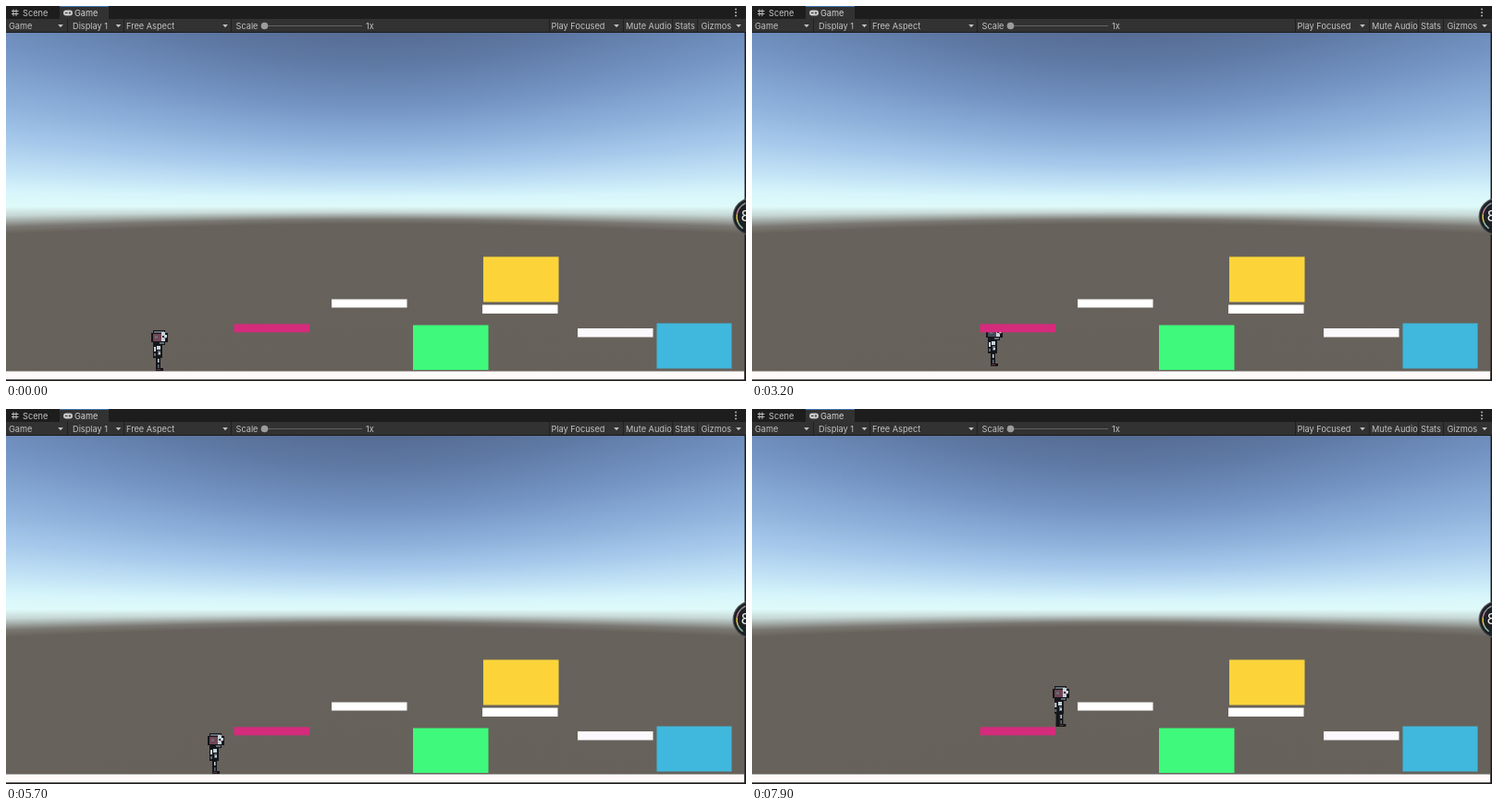
An HTML page with a canvas that plays this animation: 800x406 px, repeating every 8000 ms.

```html
<!DOCTYPE html>
<html lang="en">
<head>
<meta charset="utf-8">
<style>
  html, body { margin: 0; width: 100%; height: 100%; overflow: hidden; background: #191919; }
  canvas { display: block; width: 800px; height: 406px; }
</style>
</head>
<body>
<canvas id="stage" width="800" height="406"></canvas>
<script>
const W = 800, H = 406, LOOP = 8000, STEP = 100;
const GROUND = 395, LEDGE = 344, JUMP = 73, RISE = 577;
const ctx = document.getElementById('stage').getContext('2d');

function rect(c, color, x, y, w, h) {
  c.fillStyle = color;
  c.fillRect(x, y, w, h);
}

function circle(c, color, x, y, r) {
  c.fillStyle = color;
  c.beginPath();
  c.arc(x, y, r, 0, Math.PI * 2);
  c.fill();
}

function label(c, text, x, y, color = '#c2c2c2') {
  c.font = '9.2px Inter, Roboto, sans-serif';
  c.textBaseline = 'middle';
  c.fillStyle = color;
  c.fillText(text, x, y);
}

// Sky colours by distance below the horizon at the centre column.
const SKY = [
  [-188, '#566c94'], [-150, '#607ba7'], [-110, '#7292c1'], [-70, '#8eb1dc'],
  [-45, '#a6c9eb'], [-25, '#c0e1f5'], [-10, '#d7f5fb'], [0, '#dffaf9'],
  [6, '#c6d8d6'], [10, '#a2aaa6'], [14, '#7b7873'], [19, '#67625b'], [188, '#67615b']
];

function drawSky(c) {
  const horizon = 217, focal = 326;
  for (let x = 0; x < 799; x++) {
    const spread = Math.hypot(x - 400, focal) / focal;
    const g = c.createLinearGradient(0, horizon - 188 * spread, 0, horizon + 188 * spread);
    for (const [d, color] of SKY) g.addColorStop((d + 188) / 376, color);
    rect(c, g, x, 29, 1, 376);
  }
}

function drawToolbar(c) {
  rect(c, '#1d1d1d', 0, 0, W, 14);
  rect(c, '#323232', 58, 0, 53, 14);
  rect(c, '#3a72b0', 58, 0, 53, 1);
  rect(c, '#323232', 0, 14, W, 14);
  rect(c, '#1b1b1b', 0, 28, W, 1);

  for (const d of [0, 3]) {
    rect(c, '#bdbdbd', 7.5 + d, 3.5, 1, 7.5);
    rect(c, '#bdbdbd', 6, 5 + d, 7.5, 1);
  }
  c.fillStyle = '#c8c8c8';
  c.beginPath();
  c.roundRect(62, 4.5, 10, 6, 3);
  c.fill();
  rect(c, '#323232', 64, 7, 2.5, 1);
  circle(c, '#323232', 69, 7.5, 1);

  label(c, 'Scene', 18, 8);
  label(c, 'Game', 74, 8, '#d4d4d4');
  const items = [['Game', 3], ['Display 1', 72], ['Free Aspect', 130], ['Scale', 248.5], ['1x', 389],
    ['Play Focused', 589.5], ['Mute Audio', 670], ['Stats', 723], ['Gizmos', 751.5]];
  for (const [text, x] of items) label(c, text, x, 22);

  for (const x of [66, 127, 243, 587, 667, 720, 747]) rect(c, '#202020', x, 14, 1, 14);
  c.fillStyle = '#c2c2c2';
  for (const x of [59, 121.5, 237, 660, 792]) {
    c.beginPath();
    c.moveTo(x - 2.8, 20);
    c.lineTo(x + 2.8, 20);
    c.lineTo(x, 23.2);
    c.fill();
  }
  rect(c, '#646464', 280, 21, 105, 1);
  circle(c, '#9c9c9c', 279.5, 21.5, 3.8);
  for (const y of [3.5, 7, 10.5]) circle(c, '#c4c4c4', 789, y, 0.9);
}

function drawLevel(c) {
  rect(c, '#fcd43a', 516, 271.5, 81.5, 49);
  rect(c, '#3ef97b', 440, 345.5, 81.5, 48.5);
  rect(c, '#40b7dc', 703.5, 343.5, 81, 49);
  rect(c, '#fff', 515, 323.5, 81.5, 9.5);
  rect(c, '#fff', 352, 317.5, 81.5, 9);
  rect(c, '#fbf9fd', 618, 349, 81.5, 9.5);
  rect(c, '#fffafa', 0, 395.5, 798, 9);
  rect(c, '#1b1b1b', 0, 404.5, W, 2);
  rect(c, '#1b1b1b', 798.5, 29, 2, 377);
}

function drawDial(c) {
  circle(c, '#55585a', 806, 228, 20.5);
  circle(c, '#1d2024', 806, 228, 19.3);
  c.lineWidth = 1.5;
  [['#e6c94e', 2.75, 3.3], ['#d977a0', 3.3, 3.65], ['#8e9499', 3.65, 4.3], ['#8fb9a0', 2.2, 2.75]]
    .forEach(([color, from, to]) => {
      c.strokeStyle = color;
      c.beginPath();
      c.arc(806, 228, 16, from, to);
      c.stroke();
    });
  c.font = '16px Inter, Roboto, sans-serif';
  c.textBaseline = 'middle';
  c.fillStyle = '#f2f2f2';
  c.fillText('8', 794.5, 228.5);
}

const backdrop = document.createElement('canvas');
backdrop.width = W;
backdrop.height = H;
const back = backdrop.getContext('2d');
drawSky(back);
drawToolbar(back);
drawLevel(back);
drawDial(back);

// Horizontal path: [time, x], straight between points.
const PATH = [[0, 166], [500, 166], [1000, 211], [1400, 227], [1800, 262], [4850, 262],
  [5450, 209], [5650, 227], [5700, 227], [6400, 295], [7500, 295], [7900, 334], [8000, 334]];

function heroX(t) {
  const i = Math.max(1, PATH.findIndex(([time]) => time >= t));
  const [t0, x0] = PATH[i - 1], [t1, x1] = PATH[i];
  return x0 + (x1 - x0) * (t - t0) / (t1 - t0);
}

const jumpY = t => GROUND - JUMP * (1 - ((t - RISE) / RISE) ** 2);

function heroY(t) {
  if (t < 3180) return GROUND;
  if (t < 4074) return jumpY(t - 3180);
  if (t < 5050) return LEDGE;
  if (t < 5530) return LEDGE + JUMP * ((t - 5050) / RISE) ** 2;
  if (t < 6350) return GROUND;
  if (t < 7244) return jumpY(t - 6350);
  return LEDGE;
}

function drawHero(t) {
  const x = heroX(t), y = heroY(t);
  const airborne = y !== GROUND && y !== LEDGE;
  const walking = !airborne && Math.abs(x - heroX(Math.max(0, t - 50))) > 0.5;
  const settling = (t > 4074 && t < 4600) || (t > 7244 && t < 7500);
  const swing = walking ? Math.sin(t / 100 * 1.7) * 2 : settling ? Math.sin(t / 100 * 1.7) : 0;
  const dark = '#14161a', steel = '#646c75', light = '#c6d4da';
  const panel = airborne || (walking && t / STEP % 4 === 2) ? '#454c58' : '#734555';
  const box = (color, bx, by, w, h) => rect(ctx, color, bx - 9, by - 44, w, h);

  ctx.save();
  ctx.translate(Math.round(x), Math.round(y));
  if (t >= 4900 && t <= 5400) ctx.scale(-1, 1);

  // legs
  box(dark, 5 - swing, 29, 4, 13);
  box(dark, 6 + swing, 29, 4, 13);
  box(light, 7 + swing, 31, 1.5, 4);
  box(steel, 7 + swing, 37, 1.5, 4);
  box(dark, 5 - swing, 41, 6, 3);
  box(dark, 6 + swing, 41, 7, 3);
  box('#6f3440', 6 + swing, 42, 4, 1);
  // torso and arm
  box(dark, 2, 16, 10, 14);
  box(light, 6, 17, 4, 4);
  box(steel, 7, 22, 3, 5);
  box(light, 8, 24, 2, 2);
  box(light, 3 - swing / 2, 18, 2, 5);
  box(steel, 3 - swing / 2, 25, 2, 3);
  // head
  box(dark, 2, 0, 13, 16);
  box(dark, 0, 3, 18, 10);
  box(steel, 3, 1, 11, 2);
  box(panel, 2, 4, 9, 8);
  box(steel, 4, 6, 3, 3);
  box(light, 11, 2, 4, 10);
  box(light, 15, 5, 2, 3);
  box(dark, 12, 6, 2, 2);
  box('#a9507a', 14, 8, 2, 1);
  box(steel, 9, 13, 5, 2);
  ctx.restore();
}

const drawPinkLedge = () => rect(ctx, '#d52b7c', 246.5, 344.3, 81.5, 9);

function frame() {
  const t = Math.floor(performance.now() % LOOP / STEP) * STEP;
  ctx.drawImage(backdrop, 0, 0);
  const inFront = t >= 5800;
  if (inFront) drawPinkLedge();
  drawHero(t);
  if (!inFront) drawPinkLedge();
  requestAnimationFrame(frame);
}
frame();
</script>
</body>
</html>
```
